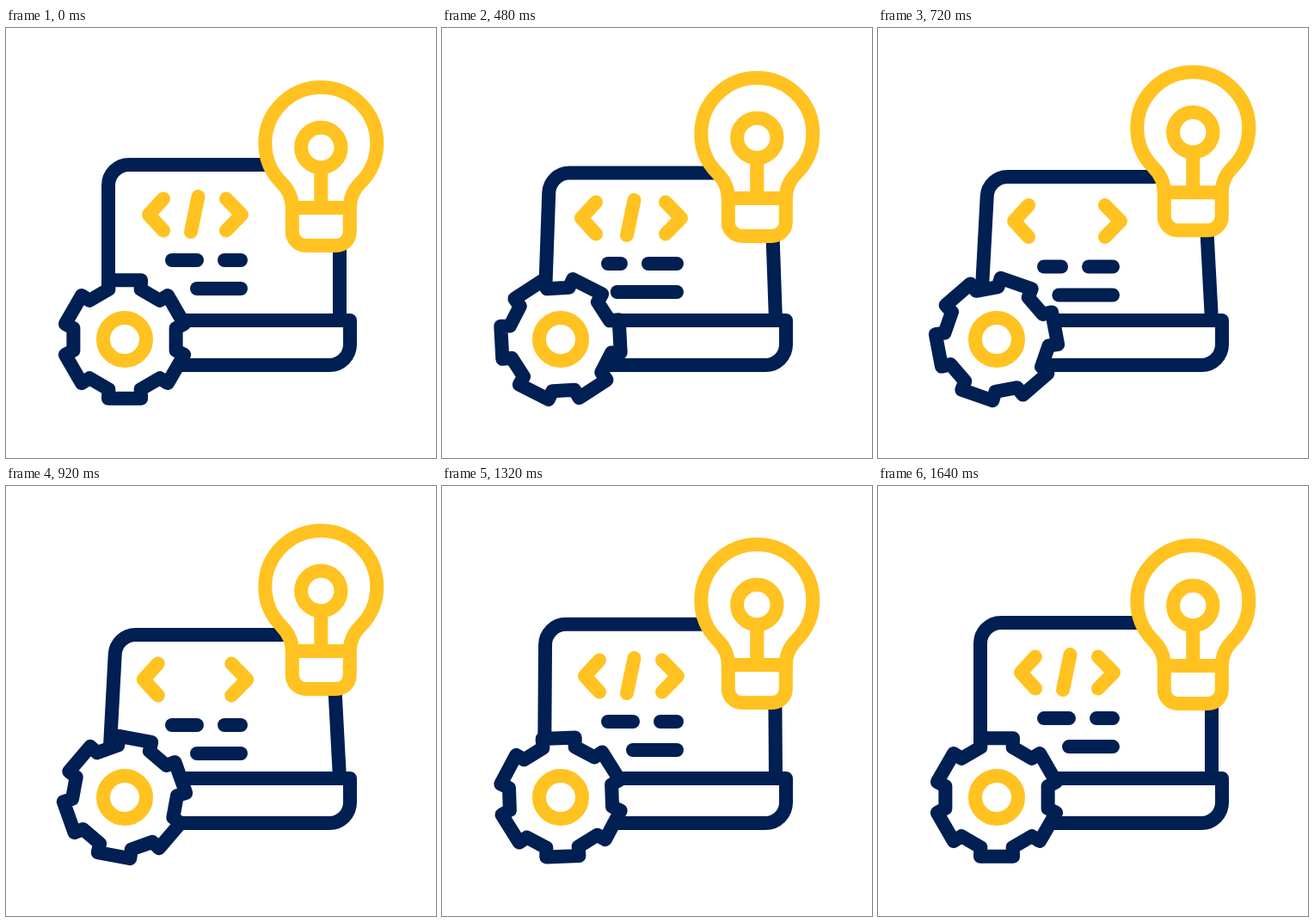
Animation of 500x500 px, one loop 1.68 s. Source, as an HTML page with a canvas:

```html
<!DOCTYPE html>
<html lang="en">
<head>
<meta charset="utf-8">
<title>Development idea</title>
<style>
  html, body { margin: 0; width: 100%; height: 100%; overflow: hidden; background: #fff; }
  canvas { display: block; width: 500px; height: 500px; }
</style>
</head>
<body>
<canvas id="stage" width="500" height="500"></canvas>
<script>
const ctx = document.getElementById('stage').getContext('2d');
const NAVY = '#001f52', YELLOW = '#ffc220';
const LOOP = 1680, STEP = 40, HANDLE = 0.51;

// Symmetric cubic-bezier(h, 0, 1 - h, 1), solved by bisection.
function ease(x) {
  if (x <= 0) return 0;
  if (x >= 1) return 1;
  let lo = 0, hi = 1;
  for (let i = 0; i < 24; i++) {
    const s = (lo + hi) / 2, r = 1 - s;
    const bx = 3 * HANDLE * s * r * r + 3 * (1 - HANDLE) * s * s * r + s * s * s;
    if (bx < x) lo = s; else hi = s;
  }
  return lo * lo * (3 - 2 * lo);
}

const ramp = (t, from, to) => ease((t - from) / (to - from));
const pulse = (t, a, b, c, d) => ramp(t, a, b) - ramp(t, c, d);

function stroke(color) {
  ctx.strokeStyle = color;
  ctx.stroke();
}

function polyline(color, ...points) {
  ctx.beginPath();
  points.forEach(([x, y]) => ctx.lineTo(x, y));
  stroke(color);
}

function ring(x, y, r) {
  ctx.beginPath();
  ctx.arc(x, y, r, 0, Math.PI * 2);
  stroke(YELLOW);
}

function drawLaptop(tilt) {
  const top = 159 + 14 * tilt, inset = 9 * tilt;
  ctx.beginPath();
  ctx.moveTo(119, 340);
  ctx.arcTo(119 + inset, top, 250, top, 24);
  ctx.arcTo(388 - inset, top, 388, 340, 24);
  ctx.lineTo(388, 340);
  stroke(NAVY);

  ctx.beginPath();
  ctx.moveTo(138, 340);
  ctx.lineTo(400, 340);
  ctx.arcTo(400, 392, 370, 392, 24);
  ctx.lineTo(138, 392);
  stroke(NAVY);
}

function drawCode(drop, spread, slash, typed) {
  ctx.save();
  ctx.translate(0, 8 * drop);
  const s = 8 * spread;
  polyline(YELLOW, [183 - s, 198.5], [166 - s, 217], [183 - s, 235.5]);
  polyline(YELLOW, [256 + s, 198.5], [274 + s, 217], [256 + s, 235.5]);
  if (slash > 0.01) {
    polyline(YELLOW, [215 + 8.5 * slash, 237 - 41 * slash], [215, 237]);
  }
  const gap = 15 * typed;
  polyline(NAVY, [193, 270], [222 - gap, 270]);
  polyline(NAVY, [254 - gap, 270], [273, 270]);
  polyline(NAVY, [222 - 19.5 * typed, 303], [273, 303]);
  ctx.restore();
}

function drawGear(degrees) {
  const rad = Math.PI / 180;
  ctx.save();
  ctx.translate(138, 362);
  ctx.rotate(degrees * rad);
  ctx.beginPath();
  for (let tooth = 0; tooth < 6; tooth++) {
    const mid = tooth * 60 - 90;
    for (const [offset, r] of [[-17.8, 61], [-15.5, 71.4], [15.5, 71.4], [17.8, 61]]) {
      const a = (mid + offset) * rad;
      ctx.lineTo(r * Math.cos(a), r * Math.sin(a));
    }
  }
  ctx.closePath();
  ctx.fill();
  stroke(NAVY);
  ctx.restore();
  ring(138, 362, 25);
}

function drawBulb(lift) {
  ctx.save();
  ctx.translate(366.3, -18 * lift);
  ctx.beginPath();
  ctx.arc(0, 134, 65, Math.PI * 0.75, Math.PI * 2.25);
  ctx.bezierCurveTo(38, 188, 33.5, 198, 33.5, 209);
  ctx.arcTo(33.5, 253, 0, 253, 16);
  ctx.arcTo(-33.5, 253, -33.5, 209, 16);
  ctx.lineTo(-33.5, 209);
  ctx.bezierCurveTo(-33.5, 198, -38, 188, -46, 180);
  ctx.closePath();
  ctx.fill();
  stroke(YELLOW);
  polyline(YELLOW, [-33.5, 209], [33.5, 209]);
  polyline(YELLOW, [0, 163], [0, 209]);
  ring(0, 139, 23.2);
  ctx.restore();
}

function draw(t) {
  ctx.fillStyle = '#fff';
  ctx.fillRect(0, 0, 500, 500);
  ctx.lineWidth = 16;
  ctx.lineCap = ctx.lineJoin = 'round';

  drawLaptop(pulse(t, 80, 760, 880, 1490));
  drawCode(
    pulse(t, 80, 880, 960, 1680),
    pulse(t, 200, 760, 745, 1250),
    1 - pulse(t, 490, 660, 950, 1110),
    pulse(t, 80, 580, 580, 890)
  );
  drawGear(180 * ramp(t, 80, 1440));
  drawBulb(pulse(t, 100, 780, 800, 1440));
}

const start = performance.now();
function frame() {
  const t = (performance.now() - start) % LOOP;
  draw(Math.floor(t / STEP) * STEP);
  requestAnimationFrame(frame);
}
frame();
</script>
</body>
</html>
```
